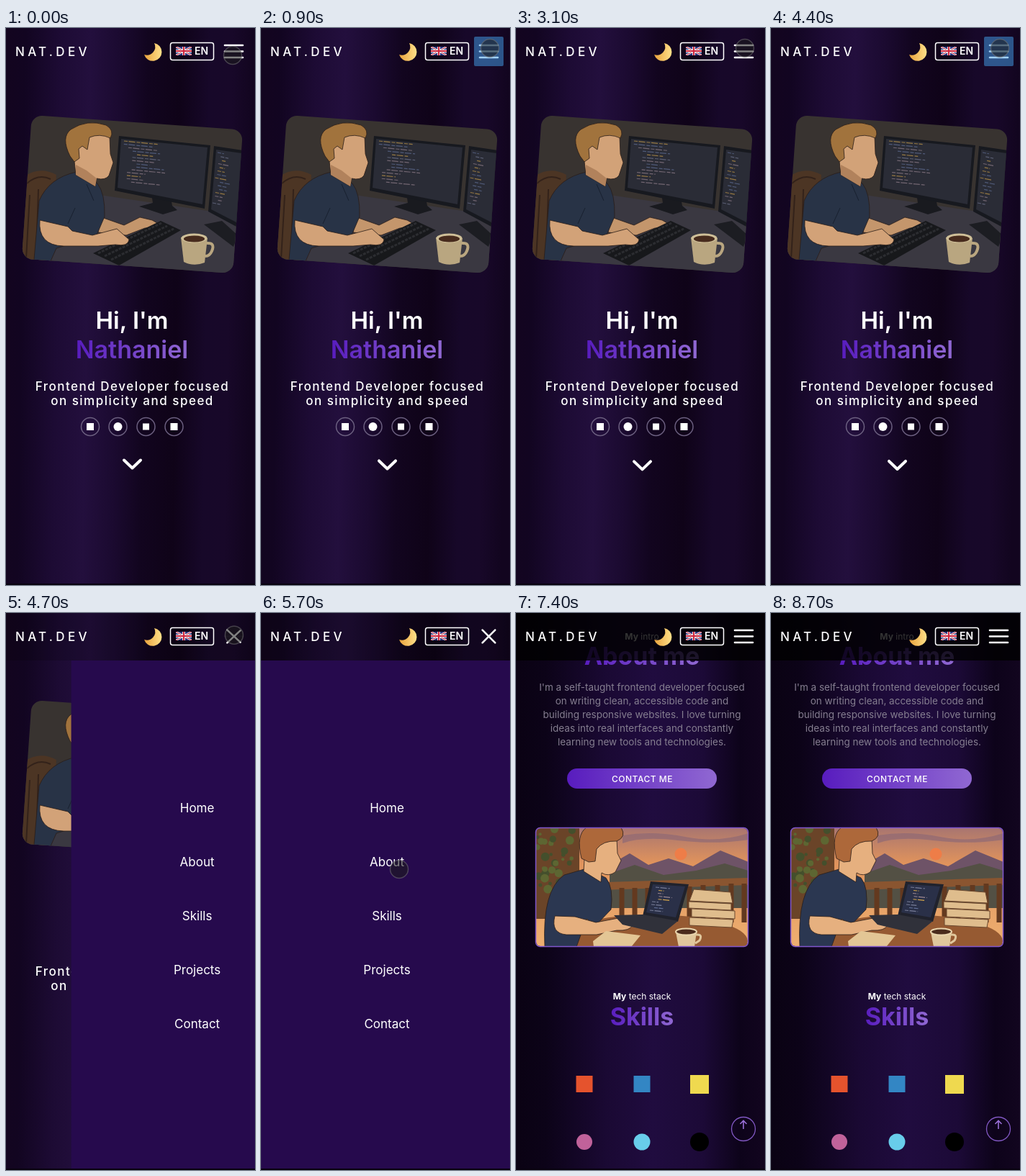
Animation of 346 by 774 pixels, one loop 8800 ms. Source, as an HTML page:

```html
<!DOCTYPE html>
<html lang="en">
<head>
<meta charset="utf-8">
<title>Portfolio</title>
<style>
html, body { margin: 0; width: 100%; height: 100%; overflow: hidden; background: #0e031b; }
#stage { position: relative; width: 346px; height: 774px; overflow: hidden; }
svg { position: absolute; inset: 0; }
text { font-family: Inter, "Liberation Sans", sans-serif; fill: #fff; text-anchor: middle; }
.title { font-size: 34px; font-weight: 600; }
.lead { font-size: 17px; font-weight: 500; letter-spacing: 1.5px; }
.copy { font-size: 13.5px; fill: #857e90; }
.small { font-size: 12px; }
.link { font-size: 17px; }
.b { font-weight: 700; }
.grad { fill: url(#violet); }
.inked { stroke: #2a1d18; stroke-width: .8; }
</style>
</head>
<body>
<div id="stage">
<svg width="346" height="774" viewBox="0 0 346 774">
<defs>
  <linearGradient id="violet"><stop stop-color="#581cbe"/><stop offset="1" stop-color="#9068d2"/></linearGradient>
  <linearGradient id="heroBg" gradientTransform="rotate(2)">
    <stop stop-color="#13051f"/><stop offset=".08" stop-color="#120521"/>
    <stop offset=".22" stop-color="#1d0b34"/><stop offset=".34" stop-color="#230f3d"/>
    <stop offset=".46" stop-color="#1b0a30"/><stop offset=".57" stop-color="#12051f"/>
    <stop offset=".7" stop-color="#0f0318"/><stop offset=".82" stop-color="#170829"/>
    <stop offset=".91" stop-color="#180829"/><stop offset="1" stop-color="#12051f"/>
  </linearGradient>
  <linearGradient id="aboutBg">
    <stop stop-color="#0a0213"/><stop offset=".12" stop-color="#0c0318"/>
    <stop offset=".36" stop-color="#1a0933"/><stop offset=".55" stop-color="#200c3f"/>
    <stop offset=".75" stop-color="#1c0a37"/><stop offset=".9" stop-color="#0d031a"/>
    <stop offset="1" stop-color="#12051f"/>
  </linearGradient>
  <linearGradient id="sky" x2="0" y2="1"><stop stop-color="#a87570"/><stop offset=".3" stop-color="#e0935c"/><stop offset="1" stop-color="#eeb071"/></linearGradient>
  <linearGradient id="gold"><stop stop-color="#e8a23c"/><stop offset="1" stop-color="#ffe08a"/></linearGradient>
  <clipPath id="card"><rect x="28.5" y="131" width="294" height="200" rx="15" transform="rotate(4 175.5 231)"/></clipPath>
  <clipPath id="frame"><rect x="28" y="299" width="294" height="164" rx="6"/></clipPath>
</defs>

<g id="page">
  <rect y="-2" width="346" height="778" fill="url(#heroBg)"/>

  <g clip-path="url(#card)">
    <rect x="20" y="115" width="315" height="230" fill="#383330"/>
    <path d="M130 232L335 262V350H20V300Z" fill="#3a3841"/>
    <path d="M20 210Q45 190 70 204L62 335H20Z" fill="#4c3524"/>
    <path d="M29 216Q45 202 62 210M33 232L28 320M45 224L42 320" fill="none" stroke="#33221a" stroke-width="2"/>
    <path d="M202 230H228L231 247L238 253L218 259L185 248L204 243Z" fill="#191a1f"/>
    <path d="M157 150L284 163L276 251L151 226Z" fill="#17191f"/>
    <path d="M160 154L280 166L273 245L155 222Z" fill="#2a2c36"/>
    <path d="M275 273L300 268L322 288L316 304Z" fill="#1c1d22"/>
    <path d="M289 164L335 171L322 277L281 255Z" fill="#17191f"/>
    <path d="M292 169L335 175L320 270L285 252Z" fill="#2a2c36"/>
    <g id="codeA" opacity=".65" transform="matrix(1 .1 -.05 1 164 157)"></g>
    <g id="codeB" opacity=".65" transform="matrix(1 .2 -.1 1 294 173)"></g>
    <path class="inked" d="M130 262L164 274L186 263L203 267Q215 273 212 277L193 278L167 288L128 284Z" fill="#c4966c"/>
    <path d="M121 313L215 268L243 281L157 330Z" fill="#17181b"/>
    <path d="M128 313L216 271M137 317L224 275M146 322L233 279" stroke="#2b2c30" stroke-width="3" stroke-dasharray="4 1.5"/>
    <path class="inked" d="M46 240Q60 208 98 200L127 216Q138 230 137 262L125 290L70 306L58 333H38Z" fill="#283346"/>
    <path d="M86 272L96 250M112 217L122 240" stroke="#18202f" fill="none"/>
    <path class="inked" d="M94 176L96 156Q126 142 144 151L145 175L149 187L143 205Q138 212 126 209L124 220L97 204Z" fill="#d2a278"/>
    <path d="M97 190L112 198L126 209L124 220L97 204Z" fill="#b1825c"/>
    <path class="inked" d="M89 178Q76 152 90 141Q113 126 139 135Q151 142 145 153Q130 146 116 152L113 169L106 164L101 168L102 181L95 186Z" fill="#a1733d"/>
    <path class="inked" d="M47 267L86 276L92 282L120 288L154 279L171 294Q170 304 152 301L128 303H80Q44 302 47 267Z" fill="#d2a278"/>
    <path d="M243 291L247 325Q261 332 276 326L280 292Z" fill="#b9a680"/>
    <path d="M279 299Q291 298 286 310Q283 317 277 317" fill="none" stroke="#b9a680" stroke-width="4"/>
    <ellipse cx="261.500" cy="292" rx="18" ry="6.500" fill="#cfbf98"/>
    <ellipse cx="261.500" cy="293" rx="14.500" ry="4.500" fill="#472b1d"/>
  </g>

  <text class="title" x="175" y="418" style="font-size:33px">Hi, I'm</text>
  <text class="title grad" x="175" y="459">Nathaniel</text>
  <text class="lead" x="175.500" y="504">Frontend Developer focused</text>
  <text class="lead" x="175.500" y="524">on simplicity and speed</text>
  <g fill="none" stroke="#6c6080" stroke-width="1.500">
    <circle cx="117" cy="554" r="12.500"/><circle cx="155.500" cy="554" r="12.500"/>
    <circle cx="194.500" cy="554" r="12.500"/><circle cx="233.500" cy="554" r="12.500"/>
  </g>
  <g fill="#fff">
    <rect x="112" y="549" width="10" height="10"/><circle cx="155.500" cy="554" r="6"/>
    <rect x="190" y="549.500" width="9" height="9"/><rect x="228.500" y="549" width="10" height="10"/>
  </g>
  <path id="chevron" d="M-11.500 -5.500L0 5.500L11.500 -5.500" fill="none" stroke="#fff" stroke-width="4" stroke-linecap="round" stroke-linejoin="round"/>

  <g transform="translate(0 774)">
    <rect width="346" height="776" fill="url(#aboutBg)"/>
    <text class="small" x="175" y="37"><tspan class="b">My</tspan> intro</text>
    <text class="title grad b" x="175" y="72">About me</text>
    <g id="copy"></g>
    <rect x="71" y="216" width="208" height="28" rx="14" fill="url(#violet)"/>
    <text class="small" x="175.500" y="234.500" font-weight="500" letter-spacing=".5">CONTACT ME</text>

    <g clip-path="url(#frame)">
      <rect x="27" y="298" width="296" height="166" fill="url(#sky)"/>
      <path d="M148 309Q190 302 235 311T323 306V315Q275 322 225 316T148 320Z" fill="#8d6775" opacity=".65"/>
      <circle cx="229" cy="335" r="8.500" fill="#ee7d48"/>
      <path d="M130 350L158 334L184 350L212 341L246 352L284 330L323 346V400H130Z" fill="#6e5367"/>
      <path d="M130 362L165 350L205 364L250 358L290 348L323 358V410H130Z" fill="#535044"/>
      <path d="M27 298H88V425H27Z" fill="#6a4428"/>
      <g id="leaves"></g>
      <path d="M60 376L323 368V378L60 387Z" fill="#8a5530"/>
      <path d="M147 382V430M165 382V430M183 382V430M241 380V430M260 378V430M280 378V430M299 376V430M317 376V430" stroke="#63391f" stroke-width="7"/>
      <ellipse cx="190" cy="456" rx="132" ry="37" fill="#965a32"/>
      <path class="inked" d="M40 464Q36 385 67 364L98 355L125 368Q136 382 132 412L111 434L98 425L84 464Z" fill="#2b3751"/>
      <path class="inked" d="M96 324L110 313H140L141 334L146 344L138 360Q128 367 119 361L118 374L94 359Z" fill="#e6b07f"/>
      <path class="inked" d="M91 341Q83 308 98 298H146Q154 311 140 317Q121 316 112 328L110 345L101 346Z" fill="#ad683a"/>
      <path class="inked" d="M54 421L82 422L111 430L142 424L162 434Q158 442 140 441L112 447H70Q48 445 54 421Z" fill="#e6b07f"/>
      <path d="M187 373L240 377L225 429L176 421Z" fill="#20222c"/>
      <path d="M190 377L235 380L222 423L181 416Z" fill="#2a3048"/>
      <g id="codeC" transform="matrix(1 .1 -.25 1 194 381)"></g>
      <path d="M136 420L176 419L225 428L203 446L148 433Z" fill="#30313a"/>
      <path d="M107 456L125 442L173 448L160 464H108Z" fill="#e3c695"/>
      <g stroke="#6a482f" fill="#dfbd8d">
        <path d="M241 423L302 426L300 437L241 434Z"/><path d="M244 411L304 414V425L244 422Z"/>
        <path d="M240 401L299 404V413L240 410Z"/><path d="M247 384L298 388L301 403L241 400Z"/>
      </g>
      <path d="M222 443L226 464H248L251 443Z" fill="#e0c79c"/>
      <path d="M250 447Q260 446 255 455L249 459" fill="none" stroke="#e0c79c" stroke-width="3"/>
      <ellipse cx="236.500" cy="443" rx="14.500" ry="4.500" fill="#4a2b1c" stroke="#e9d4ac" stroke-width="2"/>
    </g>
    <rect x="27.500" y="298.500" width="295" height="165" rx="6" fill="none" stroke="#8056cc" stroke-width="1.500"/>

    <text class="small" x="175" y="537"><tspan class="b">My</tspan> tech stack</text>
    <text class="title grad b" x="175" y="573">Skills</text>
    <rect x="83.500" y="643" width="23" height="23" fill="#e5532d"/>
    <rect x="163.500" y="643" width="23" height="23" fill="#3386c4"/>
    <rect x="242" y="642" width="26" height="26" fill="#efd94f"/>
    <circle cx="95" cy="735" r="11" fill="#c0629a"/>
    <circle cx="175" cy="735" r="11.500" fill="#68cdea"/>
    <circle cx="255" cy="735" r="13" fill="#000"/>
  </g>
</g>

<g id="up" fill="none" stroke="#8057c2">
  <circle cx="316" cy="717" r="16.500" stroke-width="1.300"/>
  <path d="M316 717V706M311.500 710L316 705.500L320.500 710" stroke="#9a70d8" stroke-width="1.600"/>
</g>

<g id="menu"><rect y="66" width="346" height="706" fill="#260a4d"/></g>
<rect id="tint" width="346" height="66"/>
<rect y="772" width="346" height="2" fill="#08020f"/>

<text x="13" y="38.500" font-size="17" font-weight="500" letter-spacing="4.300" style="text-anchor:start">NAT.DEV</text>
<path d="M206 21A12.500 12.500 0 1 1 192 37A11.500 11.500 0 0 0 206 21Z" fill="url(#gold)"/>
<rect x="228.500" y="20.500" width="60" height="24" rx="3" fill="none" stroke="#fff" stroke-width="1.500"/>
<svg x="236" y="26" width="22" height="12" viewBox="0 0 22 12">
  <rect width="22" height="12" fill="#27337e"/>
  <path d="M0 0L22 12M22 0L0 12" stroke="#eee" stroke-width="2.600"/>
  <path d="M0 0L22 12M22 0L0 12" stroke="#cf2740"/>
  <path d="M11 0V12M0 6H22" stroke="#eee" stroke-width="4"/>
  <path d="M11 0V12M0 6H22" stroke="#cf2740" stroke-width="2.200"/>
</svg>
<text x="271.500" y="37" font-size="14" font-weight="600">EN</text>
<g id="bars" stroke="#fff" stroke-width="2.600" stroke-linecap="round">
  <path d="M-12.500 0H12.500"/><path d="M-12.500 0H12.500"/><path d="M-12.500 0H12.500"/>
</g>
<rect id="tap" x="296" y="12" width="41" height="41" rx="2" fill="#44a3f0"/>
<circle id="touch" r="12.500" fill="#1c1c1c" fill-opacity=".55" stroke="#777" stroke-opacity=".5" stroke-width="1.500"/>
</svg>
</div>
<script>
const LOOP = 8800, SCROLL = 774;
const $ = id => document.getElementById(id);
const clamp = v => Math.max(0, Math.min(1, v));
const span = (t, start, length) => clamp((t - start) / length);

let seed = 7;
const rand = () => (seed = seed * 16807 % 2147483647) / 2147483647;

function addCode(id, rows, width, gap) {
  const colors = ['#767b96', '#d1a34a', '#65749d', '#9a8692'];
  let out = '';
  for (let i = 0; i < rows; i++) {
    const indent = Math.floor(rand() * 4) * width * .07;
    const length = width * (.15 + rand() * .4);
    out += `<path d="M${indent} ${i * gap}h${length}" stroke="${colors[Math.floor(rand() * 4)]}" stroke-dasharray="5 1.500 9 2" stroke-width="1.200"/>`;
  }
  $(id).innerHTML = out;
}
addCode('codeA', 14, 90, 4.3);
addCode('codeB', 15, 34, 5);
addCode('codeC', 9, 36, 4);

$('leaves').innerHTML = Array.from({ length: 40 }, (_, i) =>
  `<circle cx="${28 + rand() * 52}" cy="${300 + rand() * 85}" r="${2 + rand() * 4}" fill="${i % 2 ? '#5d6632' : '#444f2c'}"/>`).join('');

$('copy').innerHTML = [
  "I'm a self-taught frontend developer focused",
  'on writing clean, accessible code and',
  'building responsive websites. I love turning',
  'ideas into real interfaces and constantly',
  'learning new tools and technologies.'
].map((line, i) => `<text class="copy" x="175" y="${108 + 19 * i}">${line}</text>`).join('');

$('menu').innerHTML += ['Home', 'About', 'Skills', 'Projects', 'Contact']
  .map((label, i) => `<text class="link" x="175" y="${277 + 75 * i}">${label}</text>`).join('');

// CSS "ease": cubic-bezier(.25, .1, .25, 1)
function ease(p) {
  let lo = 0, hi = 1;
  const curve = (s, a, b) => 3 * s * (1 - s) ** 2 * a + 3 * s * s * (1 - s) * b + s ** 3;
  for (let i = 0; i < 20; i++) {
    const mid = (lo + hi) / 2;
    if (curve(mid, .25, .25) < p) lo = mid; else hi = mid;
  }
  return curve(lo, .1, 1);
}
const inOut = p => p < .5 ? 4 * p ** 3 : 1 - 4 * (1 - p) ** 3;

// Menu clicks: open, close, open, close
const clicks = [930, 2300, 4480, 5925];
const toggled = (t, length) => clicks.reduce((sum, at, i) =>
  sum + (i % 2 ? -1 : 1) * ease(span(t, at, length)), 0);

// Touch path: time, x, y
const touchPath = [[0, 315, 38], [700, 318, 28], [4600, 318, 28], [5400, 192, 356], [5800, 192, 356], [6200, 194, 356]];
function touchAt(t) {
  let [, x, y] = touchPath[0];
  for (let i = 1; i < touchPath.length; i++) {
    const [from, x0, y0] = touchPath[i - 1], [to, x1, y1] = touchPath[i];
    const p = inOut(span(t, from, to - from));
    x += (x1 - x0) * p;
    y += (y1 - y0) * p;
  }
  return [x, y];
}

const bars = $('bars').children;
function draw(t) {
  const open = toggled(t, 500), cross = toggled(t, 300);
  const scrolled = span(t, 6330, 150);
  $('page').setAttribute('transform', `translate(0 ${-SCROLL * inOut(span(t, 6200, 475))})`);
  $('menu').setAttribute('transform', `translate(${346 * (1 - open)} 0)`);
  $('chevron').setAttribute('transform', `translate(175.5 ${607 - Math.cos(2 * Math.PI * t / 1200)})`);
  $('tint').setAttribute('opacity', Math.max(.25 * open, .8 * scrolled));
  $('up').setAttribute('opacity', span(t, 6350, 300));

  [-1, 0, 1].forEach((side, i) => {
    bars[i].setAttribute('transform', `translate(316.5 ${32.5 + side * 8.5 * (1 - cross)}) rotate(${-side * 45 * cross})`);
  });
  bars[1].setAttribute('opacity', 1 - cross);

  const tapped = clicks.slice(0, 3).some(at => t >= at - 130 && t < at + 20);
  $('tap').setAttribute('opacity', tapped ? .5 : 0);
  $('touch').setAttribute('transform', `translate(${touchAt(t)})`);
  $('touch').setAttribute('opacity', t < 7300 ? 1 : 0);
}

const start = performance.now();
function tick() {
  draw((performance.now() - start) % LOOP);
  requestAnimationFrame(tick);
}
tick();
</script>
</body>
</html>
```
